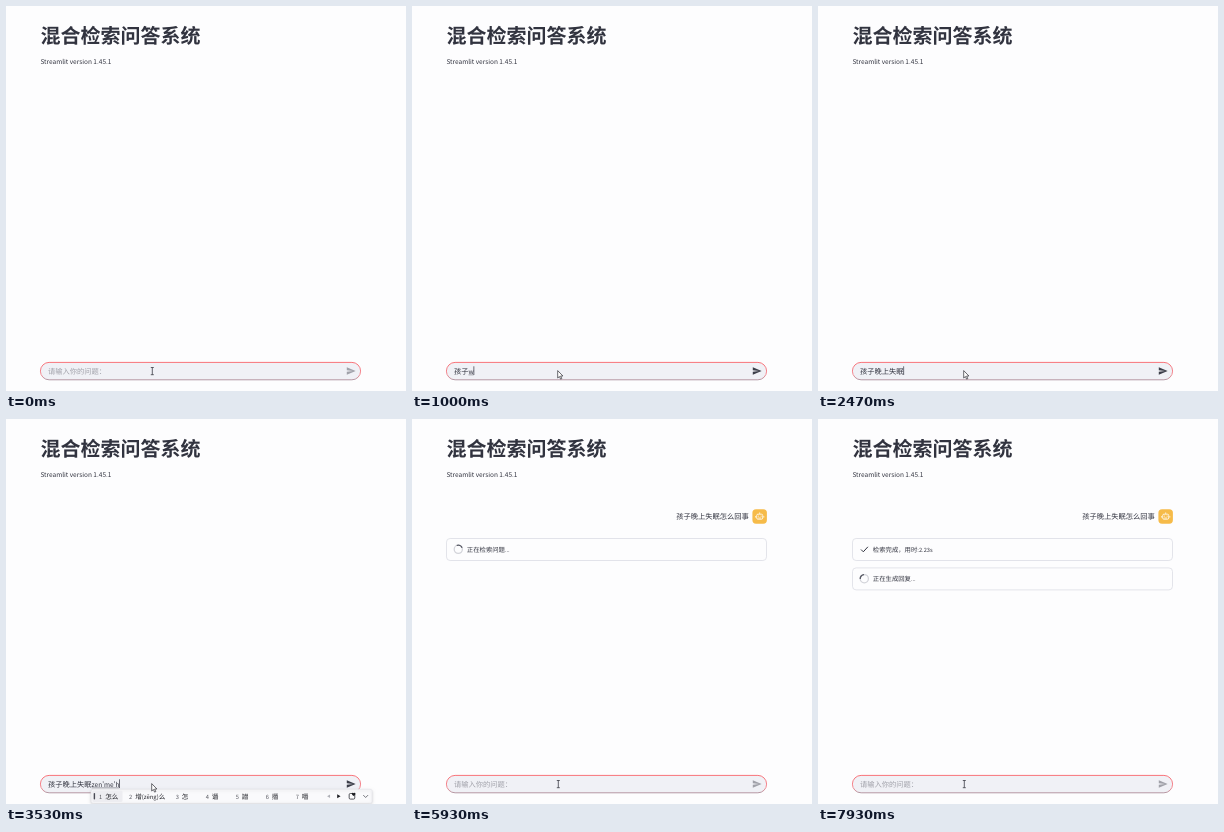
Animation, 400 px wide and 385 px high, one loop 8 s. Source, as an HTML page with a canvas:

```html
<!DOCTYPE html>
<html lang="zh-CN">
<head>
<meta charset="utf-8">
<title>混合检索问答系统</title>
<style>
  html, body { margin: 0; width: 100%; height: 100%; overflow: hidden; background: #fdfdfe; }
  canvas { display: block; width: 400px; height: 385px; }
</style>
</head>
<body>
<canvas id="stage"></canvas>
<script>
const LOOP = 8000, TICK = 1000 / 15;
const SENT = 4730, ASKED = 4870, RETRIEVED = 7070;
const INK = '#31333f', PALE = '#fdfdfe';
const FONT = '"Noto Sans CJK SC", "Noto Sans CJK", "Noto Sans CJK JP", sans-serif';
const LATIN_SCALE = 0.895;   // Latin letters are drawn a little smaller than the Han glyphs
const QUESTION = '孩子晚上失眠怎么回事';

// [start time, committed text, pinyin being composed, candidates]
const TYPING = [
  [0, '', '', ''],
  [70, '', 'h', ''],
  [130, '', 'h', '和 好 会 还 很 或 后'],
  [200, '', 'ha', '哈 蛤 铪 嗨 还 孩 好'],
  [330, '', 'hai', '还 海 孩 害 嗨 亥 骸'],
  [470, '', "hai'z", '孩子 还在 还 海 孩 害 嗨'],
  [600, '', "hai'zi", '孩子 海子 还 海 孩 害 嗨'],
  [730, '孩子', '', ''],
  [1000, '孩子', 'w', ''],
  [1130, '孩子', 'wan', '玩 完 万 晚 碗 湾 弯'],
  [1200, '孩子', "wan's", '晚上 玩 完 万 晚 碗 湾'],
  [1270, '孩子', "wan'shang", '晚上 玩赏 玩 完 万 晚 碗'],
  [1530, '孩子晚上', '', ''],
  [1930, '孩子晚上', 'shi', '是 十 时 使 ⑩ Ⅹ 事'],
  [2000, '孩子晚上', "shi'm", '什么 是 十 时 使 事 市'],
  [2330, '孩子晚上', "shi'mian", '失眠 市面 十面 湿面 世面 是 十'],
  [2470, '孩子晚上失眠', '', ''],
  [3070, '孩子晚上失眠', 'ze', '则 责 泽 择 仄 啧 帻'],
  [3330, '孩子晚上失眠', "zen'm", '怎 增(zēng) 怎么 谮 譛 撍 噆'],
  [3530, '孩子晚上失眠', "zen'me'h", '怎么 增(zēng)么 怎 谮 譛 撍 噆'],
  [3670, '孩子晚上失眠', "zen'me'hu", '怎么会 增(zēng) 怎么 怎 谮 譛 撍'],
  [3730, '孩子晚上失眠', "zen'me'hui", '怎么会 增(zēng) 怎么 怎 谮 譛 撍'],
  [3930, '孩子晚上失眠', "zen'me'hui'shi", '怎么回事 怎么会 增(zēng) 怎么 怎 谮 譛'],
  [4000, QUESTION, '', ''],
  [SENT, '', '', '']
];

const canvas = document.getElementById('stage');
const ratio = window.devicePixelRatio || 1;
canvas.width = 400 * ratio;
canvas.height = 385 * ratio;
const ctx = canvas.getContext('2d');
ctx.scale(ratio, ratio);
ctx.textRendering = 'geometricPrecision';

// Draws mixed Han/Latin text and returns the x where it ends.
function text(str, x, y, size, color = INK, weight = 400, visible = true) {
  ctx.fillStyle = color;
  for (const run of str.match(/[\x00-\u017f]+|[^\x00-\u017f]+/g) || []) {
    const px = run.charCodeAt(0) < 0x180 ? size * LATIN_SCALE : size;
    ctx.font = `${weight} ${px}px ${FONT}`;
    if (visible) ctx.fillText(run, x, y);
    x += ctx.measureText(run).width;
  }
  return x;
}
const textWidth = (str, size) => text(str, 0, 0, size, INK, 400, false);

function box(x, y, w, h, r, fill, stroke, line = 1) {
  ctx.beginPath();
  ctx.roundRect(x, y, w, h, r);
  if (fill) { ctx.fillStyle = fill; ctx.fill(); }
  if (stroke) { ctx.strokeStyle = stroke; ctx.lineWidth = line; ctx.stroke(); }
}

function shape(d, x, y, scale, fill, stroke, line) {
  const path = new Path2D(d);
  ctx.save();
  ctx.translate(x, y);
  ctx.scale(scale, scale);
  if (fill) { ctx.fillStyle = fill; ctx.fill(path); }
  if (stroke) { ctx.strokeStyle = stroke; ctx.lineWidth = line; ctx.stroke(path); }
  ctx.restore();
}

function arc(x, y, r, from, to, color, line) {
  ctx.beginPath();
  ctx.arc(x, y, r, from, to);
  ctx.strokeStyle = color;
  ctx.lineWidth = line;
  ctx.stroke();
}

function spinner(y, elapsed) {
  const top = -Math.PI / 2 + elapsed / 1000 * 2 * Math.PI;
  arc(46.3, y, 4.1, 0, 7, '#d3d4da', 1.3);
  arc(46.3, y, 4.1, top - Math.PI / 4, top + Math.PI / 4, '#555762', 1.3);
}

function status(y, label, elapsed) {
  box(34.5, y + 0.5, 320, 22, 3.6, null, '#dcdde5', 0.8);
  if (elapsed === null) shape('M43 11.5l2.3 2.3 4.6-5', 0, y, 1, null, INK, 1);
  else spinner(y + 11.3, elapsed);
  text(label, 54.8, y + 13.6, 6.36);
}

function userMessage() {
  text(QUESTION, 264.2, 100.3, 7.27);
  box(340.4, 90.2, 14.5, 14.5, 3.6, '#f6bb49');
  box(344.7, 95.2, 6, 5, 1.2, null, '#fff', 0.8);
  shape('M347.7 95v-1.6M343.6 97v1.6M351.8 97v1.6M346.2 99h3', 0, 0, 1, null, '#fff', 0.7);
  for (const x of [346.3, 349.1]) arc(x, 97.1, 0.3, 0, 7, '#fff', 0.5);
}

function inputBar(committed, pinyin, caretOn) {
  const border = ctx.createLinearGradient(0, 356, 0, 374);
  border.addColorStop(0, '#f8636a');
  border.addColorStop(0.7, '#f27c85');
  border.addColorStop(1, '#a88e9b');
  box(34.4, 356.4, 320.2, 17.4, 8.7, '#f0f1f6', border, 0.9);
  const filled = committed || pinyin;
  shape('M-10.5 9L10.5 0-10.5-9V-2L4.5 0-10.5 2z', 345.2, 365, 0.42, filled ? '#3c3e49' : '#a0a1a9');
  const start = text(committed, 42, 367.5, 7.27);
  const end = text(pinyin, start, 367.5, 7.27);
  if (!filled) text('请输入你的问题：', 42, 367.5, 7.27, '#a0a1a9');
  ctx.fillStyle = '#6b6c76';
  if (pinyin) ctx.fillRect(start, 368.6, end - start, 0.6);
  ctx.fillStyle = INK;
  if (caretOn) ctx.fillRect(end - 0.2, 360.3, 0.7, 8.7);
  return start;
}

function candidatePopup(left, words) {
  const widths = words.map(w => Math.max(30, textWidth(w, 6.6) + 16.5));
  const width = widths.reduce((a, b) => a + b, 54.5);
  ctx.save();
  ctx.shadowColor = 'rgba(0,0,0,.14)';
  ctx.shadowBlur = 3;
  ctx.shadowOffsetY = 1;
  box(left, 370.3, width, 13.9, 2, '#fafafc', '#e2e2e8', 0.6);
  ctx.restore();
  box(left + 1.5, 371.6, widths[0], 11.4, 1.5, '#ededf1');
  box(left + 2.7, 374, 1.4, 6.5, 0.7, '#4a4b55');
  let x = left + 8;
  words.forEach((word, i) => {
    text(String(i + 1), x, 379.7, 6.4, '#55565e');
    text(word, x + 6.2, 379.8, 6.6, '#222329');
    x += widths[i];
  });
  shape('M1.6-1.8v3.6l-3-1.8z', x + 2.8, 377.3, 1, '#b0b1b8');
  shape('M-1.5-2v4l3.4-2z', x + 13, 377.3, 1, '#1c1d22');
  box(x + 23.5, 374.5, 5.6, 5.6, 1.2, null, '#2b2c33', 0.8);
  shape('M-2-1a1 1 0 0 1 2 0a1 1 0 0 1 2 0q0 1.3-2 2.6q-2-1.3-2-2.6z', x + 28, 375.6, 0.9, '#1c1d22');
  shape('M-2.4-1.2L0 1.2 2.4-1.2', x + 40, 377.3, 1, null, '#55565e', 0.8);
}

function pointer(isArrow) {
  if (isArrow) shape('M0 0V7.4L1.7 5.9 2.9 8.5 4.1 8 2.9 5.4H5.2z', 145.7, 364.6, 1, '#fff', '#2b2c33', 0.7);
  else shape('M-1.5 0H1.5M-1.5 7.2H1.5M0 0V7.2', 146.3, 361.5, 1, null, '#3c3d46', 0.8);
}

function draw(t) {
  ctx.fillStyle = PALE;
  ctx.fillRect(0, 0, 400, 385);
  text('混合检索问答系统', 34.5, 37.2, 20, INK, 700);
  text('Streamlit version 1.45.1', 34.4, 57.9, 7.27);

  const spinTime = Math.floor((t + 5) / TICK) * TICK;
  if (t >= ASKED) {
    userMessage();
    const done = t >= RETRIEVED;
    status(119, done ? '检索完成，用时:2.23s' : '正在检索问题...', done ? null : spinTime - ASKED);
    if (done) status(148.4, '正在生成回复...', spinTime - RETRIEVED);
  }

  const [, committed, pinyin, candidates] = TYPING.findLast(step => t >= step[0]);
  const typing = Boolean(committed || pinyin);
  const blink = t >= ASKED && (t - 5070 + 1060) % 1060 < 530;
  const start = inputBar(committed, pinyin, typing || blink);
  if (candidates) candidatePopup(start - 0.6, candidates.split(' '));
  pointer(typing);
}

function loop() {
  draw(performance.now() % LOOP);
  requestAnimationFrame(loop);
}
loop();
</script>
</body>
</html>
```
